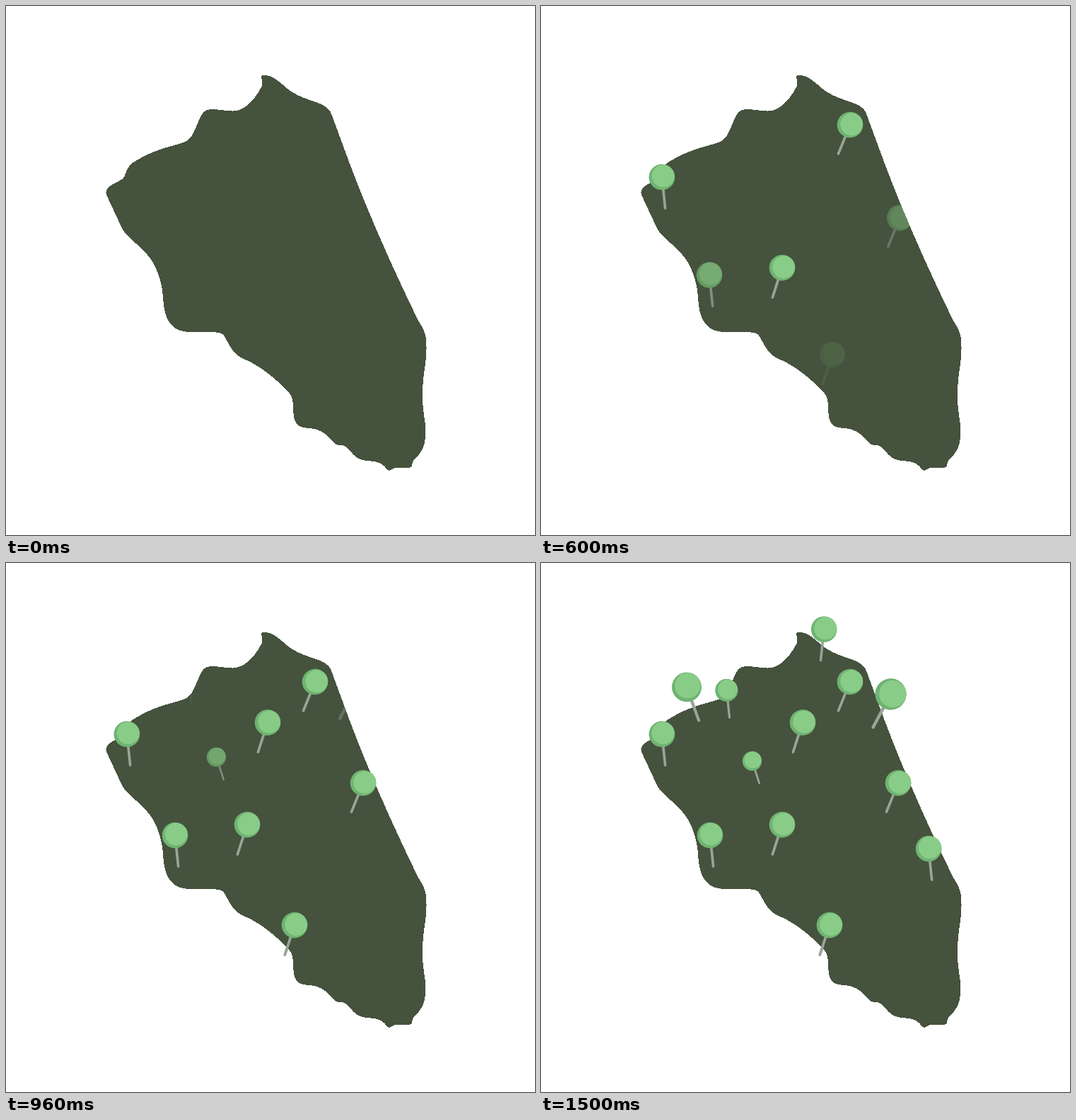
Write an HTML page that moves like this. It is 748 by 748 pixels and loops after 1800 ms.

```html
<!DOCTYPE html>
<html lang="en">
<head>
<meta charset="utf-8">
<title>Map pins</title>
<style>
  html, body { margin: 0; width: 100%; height: 100%; overflow: hidden; background: #fff; }
  svg { display: block; width: 100vw; height: 100vh; }
</style>
</head>
<body>
<svg viewBox="0 0 748 748">
  <defs>
    <path id="land" shape-rendering="crispEdges" d="M361 101Q364 110 361 115
      C350 135 336 149 320 148.5S293 144 283 147.5S269 180 258 189S218 197 180 221
      C167 231 171 240 164 245S138 255 142 267L163 312
      C175 339 215 342 222 410C223 433 227 461 260 461S300 460.5 306 464S317 491 334 498S370 516 399 545
      C413 559 399 585 415 594C424 599 437 594 451 605S462 621 473 621S486 632 497 639
      S520 641 530 647S538 660 546 655S558 655 570 653C576 652 573 648 576 643
      S591 632 593 610S588 575 589 545S594 510 594.5 485S589 456 582 443
      C543 363 505 277 475 193L461 155C456 134 426 137 402 120C392 113 379 98 367 98Q361 97 361 101Z"/>
    <clipPath id="inland"><use href="#land"/></clipPath>
    <g id="pin" stroke-linecap="round">
      <path d="M0 .8V2.41" stroke="#98a698" stroke-width=".2"/>
      <circle r="1" fill="#70b372"/>
      <circle cx=".1" cy="-.08" r=".87" fill="#88cc87"/>
    </g>
  </defs>
  <g id="back"></g>
  <use href="#land" fill="#45523d"/>
  <g id="front"></g>
</svg>
<script>
const LOOP = 1800, STEP = 30, BEAT = 93, FADE = 310;
const DROP = 23, DRIFT = 0.2;

// Head centre, lean in degrees and, where it is not the usual one, radius.
const PINS = [
  [171, 242, -6], [437, 168, 22], [341, 370, 18], [239, 385, -6], [505, 311, 22],
  [408, 512, 18], [370, 225.5, 18], [298.5, 280, -18, 13.7], [494.5, 185.5, 28, 22],
  [262.5, 180, -6, 16], [206, 175.5, -20, 20.8], [548, 404, -6], [400, 94.5, 6]
];

function addUse(layer, x, y, lean, r) {
  const make = tag => document.createElementNS("http://www.w3.org/2000/svg", tag);
  const clip = make("g"), mover = make("g"), use = make("use");
  use.setAttribute("href", "#pin");
  use.setAttribute("transform", `translate(${x} ${y}) rotate(${lean}) scale(${r})`);
  mover.append(use);
  clip.append(mover);
  document.getElementById(layer).append(clip);
  return { clip, mover };
}

const pins = PINS.map(([x, y, lean, r = 18.3], i) => ({
  start: BEAT * (i < 2 ? i : i + 1), // one beat of rest after the opening pair
  drift: DRIFT * Math.sign(lean),
  back: addUse("back", x, y, lean, r),
  front: addUse("front", x, y, lean, r)
}));

function render(time) {
  const t = Math.floor(time % LOOP / STEP) * STEP;
  for (const { start, drift, back, front } of pins) {
    const p = Math.min(1, Math.max(0, (t - start) / FADE));
    const rise = DROP * (1 - p) ** 1.2;
    for (const { mover } of [back, front]) {
      mover.setAttribute("transform", `translate(${drift * rise} ${-rise})`);
    }
    // Off the land a pin is either hidden or solid.
    back.clip.setAttribute("visibility", p >= 0.5 ? "visible" : "hidden");
    front.clip.setAttribute("opacity", p);
    front.clip.setAttribute("clip-path", p < 1 ? "url(#inland)" : "none");
  }
}

const begin = performance.now();
function tick() {
  render(performance.now() - begin);
  requestAnimationFrame(tick);
}
tick();
</script>
</body>
</html>
```
